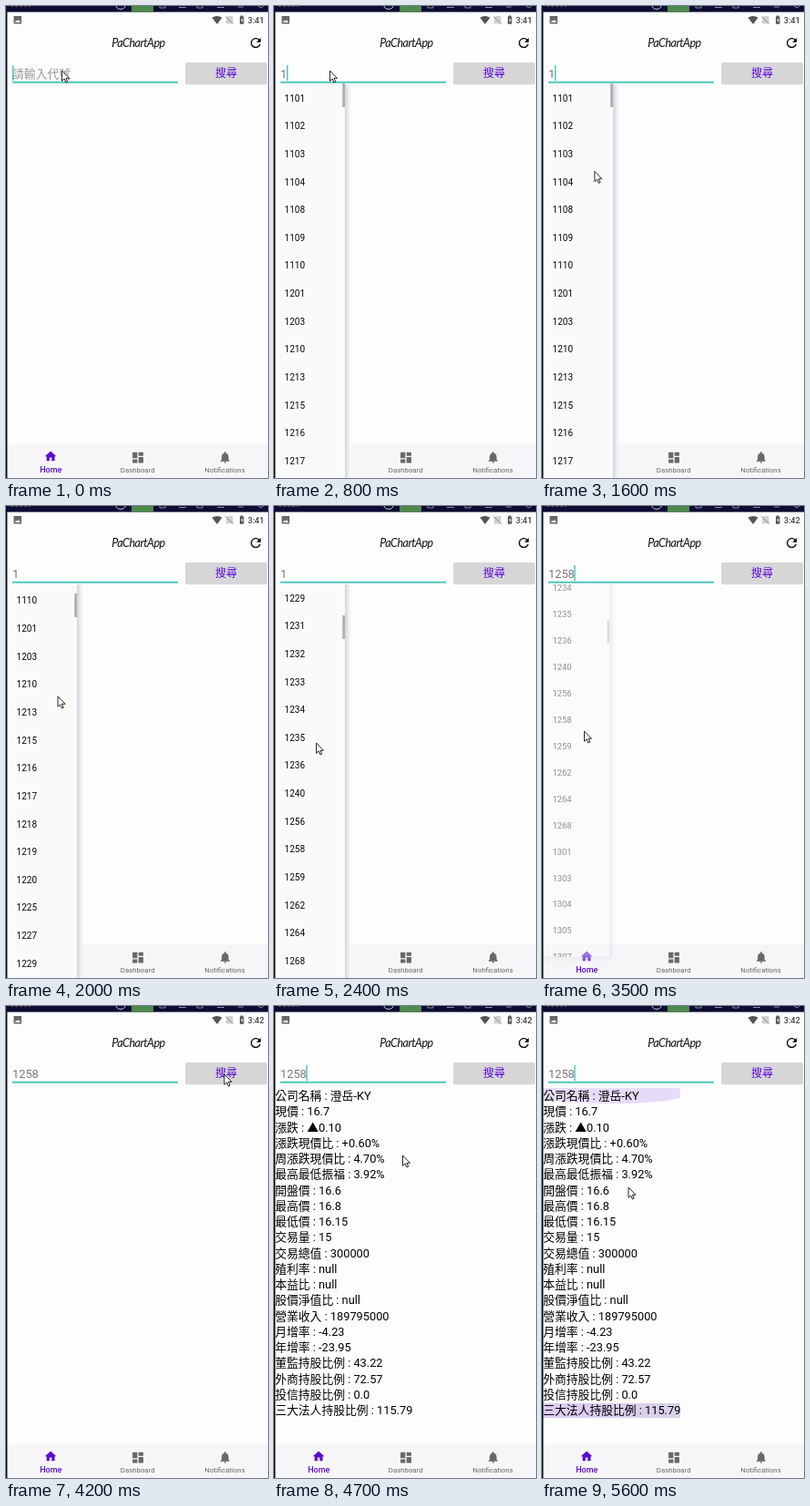
Animation of 288 by 518 pixels, one loop 5700 ms. Source, as an HTML page:

```html
<!DOCTYPE html>
<html lang="zh-Hant">
<head>
<meta charset="utf-8">
<title>Stock lookup</title>
<style>
  html, body { margin: 0; width: 100%; height: 100%; overflow: hidden; background: #fdfdfd; }
  svg { display: block; width: 288px; height: 518px; }
  text { font-family: Roboto, "Noto Sans CJK TC", "Noto Sans CJK JP", "Noto Sans CJK", sans-serif; white-space: pre; }
  .mid { text-anchor: middle; }
  .code { font-size: 10px; fill: #080808; }
  .row { font-size: 12.8px; fill: #000; }
  .field { font-size: 12.8px; }
  .title { font: italic 400 12.5px Lato, sans-serif; letter-spacing: -.5px; fill: #101010; }
</style>
</head>
<body>
<svg viewBox="0 0 288 518">
  <defs>
    <linearGradient id="side">
      <stop offset="0" stop-color="#d2d2da"/>
      <stop offset=".4" stop-color="#e8e8f0"/>
      <stop offset="1" stop-color="#f8f8fc" stop-opacity="0"/>
    </linearGradient>
    <linearGradient id="under" x2="0" y2="1">
      <stop offset="0" stop-color="#d8d8e0"/>
      <stop offset="1" stop-color="#f8f8fc" stop-opacity="0"/>
    </linearGradient>
    <linearGradient id="tint">
      <stop offset="0" stop-color="#dccbf4"/>
      <stop offset="1" stop-color="#d9d2e8"/>
    </linearGradient>
    <clipPath id="listClip"><path d="M0 85H78V518H0z"/></clipPath>
  </defs>

  <rect width="288" height="518" fill="#fdfdfd"/>

  <!-- window strip -->
  <rect width="288" height="6.6" fill="#0c0c34"/>
  <rect x="138" width="24" height="6.6" fill="#4f8a4c"/>
  <g fill="none" stroke="#8c8ca4" stroke-width="1">
    <path d="M121 0a5 3.4 0 0 0 10 0" stroke="#c8c8d4"/>
    <path d="M169 0v2h6v-2M190 1.5h8M210 0v2h6v-2M232 1.5h8M255 1h6M277 0l3 2 3-2"/>
    <path d="M5 .5h22" stroke="#6a4a44" stroke-dasharray="3 2"/>
  </g>

  <!-- status bar -->
  <path d="M8.5 11h8.5v8.5H8.5zM9.8 18h6l-2-3-1.5 1.8-1-1.1z" fill="#686868" fill-rule="evenodd"/>
  <path d="M232 20l-5.6-7.2q5.6-3.8 11.2 0z" fill="#565656"/>
  <path d="M244 11h5.5v8.5H242V13z" fill="#d0d0d0"/>
  <path d="M241.5 11.5l8 8" stroke="#8c8c8c"/>
  <path d="M257 11.5h1v-1h2.200v1h1.200v8.300H257z" fill="#565656"/>
  <path d="M259.600 12.800l-1.500 3h1.200v2.500l1.400-3.200h-1.200z" fill="#fdfdfd"/>
  <text id="clock" x="265.700" y="19" font-size="9.200" font-weight="500" fill="#404040"></text>

  <!-- app bar -->
  <text class="title mid" x="145.500" y="45">PaChartApp</text>
  <path transform="translate(266.100 32.100) scale(.7)" fill="#101010" d="M17.650 6.350C16.200 4.900 14.210 4 12 4c-4.420 0-7.990 3.580-7.990 8s3.570 8 7.990 8c3.730 0 6.840-2.550 7.730-6h-2.080c-.82 2.330-3.040 4-5.650 4-3.310 0-6-2.690-6-6s2.690-6 6-6c1.660 0 3.140.69 4.220 1.780L13 11h7V4z"/>

  <!-- search row -->
  <text id="field" class="field" x="7" y="78.600"></text>
  <rect x="7" y="82.700" width="182" height="2" fill="#4cc6bc"/>
  <rect id="caret" y="65" width="1.500" height="17" fill="#4cc6bc"/>
  <rect x="197" y="62" width="90" height="24.300" rx="2" fill="#d6d6d6"/>
  <text class="mid" x="242" y="78.200" font-size="12" font-weight="500" fill="#5c08dc">搜尋</text>

  <!-- results -->
  <g id="results">
    <g id="marks">
      <path d="M1 90H152V101Q126 107 78 107Q40 107 1 103z" fill="#e6dcfa"/>
      <rect x="1" y="436" width="151" height="16" fill="url(#tint)"/>
    </g>
  </g>

  <!-- bottom navigation -->
  <rect y="481" width="288" height="37" fill="#f6f6f9"/>
  <g fill="#5c08d0">
    <path transform="translate(41.500 486.600) scale(.63)" d="M10 20v-6h4v6h5v-8h3L12 3 2 12h3v8z"/>
    <text class="mid" x="49.300" y="512" font-size="9" font-weight="500">Home</text>
  </g>
  <g fill="#686868" font-size="7.800">
    <path transform="translate(137.100 487.700) scale(.66)" d="M3 13h8V3H3zM3 21h8v-6H3zM13 21h8V11h-8zM13 3v6h8V3z"/>
    <text class="mid" x="144.700" y="512">Dashboard</text>
    <path transform="translate(233.300 487.700) scale(.63)" d="M12 22c1.100 0 2-.9 2-2h-4c0 1.100.89 2 2 2zm6-6v-5c0-3.070-1.640-5.640-4.500-6.320V4c0-.83-.67-1.500-1.500-1.500s-1.500.67-1.500 1.500v.68C7.630 5.360 6 7.920 6 11v5l-2 2v1h16v-1z"/>
    <text class="mid" x="240.500" y="512">Notifications</text>
  </g>

  <!-- suggestions -->
  <g id="popup">
    <rect x="78" y="86" width="8" height="432" fill="url(#side)"/>
    <rect y="518" width="80" height="9" fill="url(#under)"/>
    <rect y="85" width="78" height="433" fill="#fafafa"/>
    <g clip-path="url(#listClip)"><g id="codes"></g></g>
    <rect id="thumb" x="75.200" width="2.800" height="26" fill="#b0b0b0"/>
  </g>

  <rect y="6" width="1.400" height="512" fill="#08080c"/>
  <path id="mouse" d="M0 0V11.300L2.600 8.900 4.400 13 6.200 12.200 4.400 8.300H8z" fill="#fdfdfd" stroke="#101010" stroke-width=".9"/>
</svg>

<script>
const LOOP = 5700, STEP = 100;
const TYPE = 500, OPEN = 600, PICK = 3400, CLOCK = 3300, SHOW = 4400, MARK = 5500;
const PITCH = 30.63;

const codes = {
  11: '01 02 03 04 08 09 10',
  12: '01 03 10 13 15 16 17 18 19 20 25 27 29 31 32 33 34 35 36 40 56 58 59 62 64 68',
  13: '01 03 04 05 07 08 09'
};
const rows = [
  '公司名稱 : 澄岳-KY', '現價 : 16.7', '漲跌 : ▲0.10', '漲跌現價比 : +0.60%',
  '周漲跌現價比 : 4.70%', '最高最低振福 : 3.92%', '開盤價 : 16.6', '最高價 : 16.8',
  '最低價 : 16.15', '交易量 : 15', '交易總值 : 300000', '殖利率 : null',
  '本益比 : null', '股價淨值比 : null', '營業收入 : 189795000', '月增率 : -4.23',
  '年增率 : -23.95', '董監持股比例 : 43.22', '外商持股比例 : 72.57',
  '投信持股比例 : 0.0', '三大法人持股比例 : 115.79'
];

// [time, value...]
const mousePath = [
  [0, 61.5, 71], [1200, 61.5, 71], [1700, 57, 209], [2000, 57, 209], [2400, 46.5, 260],
  [2900, 46.5, 260], [3300, 46.5, 247], [3700, 46.5, 247], [4200, 240, 75], [4400, 240, 75],
  [4700, 141.5, 164], [5000, 141.5, 164], [5400, 95, 199]
];
const scrollPath = [[0, 0], [1700, 0], [2000, 181], [2400, 582], [2800, 716]];
const popupPath = [[0, 0], [OPEN - 100, 0], [OPEN + 100, 1], [PICK, 1], [PICK + 180, 0]];

const $ = id => document.getElementById(id);
const show = (id, on) => $(id).setAttribute('visibility', on ? 'visible' : 'hidden');

function addText(parent, cls, x, y, str) {
  const el = document.createElementNS('http://www.w3.org/2000/svg', 'text');
  el.setAttribute('class', cls);
  el.setAttribute('x', x);
  el.setAttribute('y', y);
  el.textContent = str;
  parent.append(el);
}

function along(path, t) {
  const i = path.findIndex(k => k[0] > t);
  if (i < 0) return path[path.length - 1].slice(1);
  const a = path[i - 1], b = path[i], p = (t - a[0]) / (b[0] - a[0]);
  return a.slice(1).map((v, j) => v + (b[j + 1] - v) * p);
}

Object.entries(codes)
  .flatMap(([head, tails]) => tails.split(' ').map(tail => head + tail))
  .forEach((code, i) => addText($('codes'), 'code', 11.6, 104.7 + i * PITCH, code));
rows.forEach((row, i) => addText($('results'), 'row', 1.2, 103.2 + i * 17.25, row));

function draw(t) {
  const value = t < TYPE ? '' : t < PICK ? '1' : '1258';
  $('field').textContent = value || '請輸入代號';
  $('field').setAttribute('fill', value ? '#787878' : '#989898');

  const since = t - (t < TYPE ? 0 : t < PICK ? TYPE : PICK);
  $('caret').setAttribute('x', 6.8 + value.length * 7.1);
  show('caret', since % 1000 < 500);

  const [scroll] = along(scrollPath, t);
  $('codes').setAttribute('transform', `translate(0 ${-scroll})`);
  $('thumb').setAttribute('y', 85 + scroll * .06);

  const [open] = along(popupPath, t);
  const size = .903 + .097 * open;
  $('popup').setAttribute('opacity', open);
  $('popup').setAttribute('transform', `translate(8 85) scale(${size}) translate(-8 -85)`);

  $('clock').textContent = t < CLOCK ? '3:41' : '3:42';
  show('results', t >= SHOW);
  show('marks', t >= MARK);
  $('mouse').setAttribute('transform', `translate(${along(mousePath, t)})`);
}

const start = performance.now();
function tick() {
  const t = (performance.now() - start) % LOOP;
  draw(Math.floor(t / STEP) * STEP);
  requestAnimationFrame(tick);
}
tick();
</script>
</body>
</html>
```
